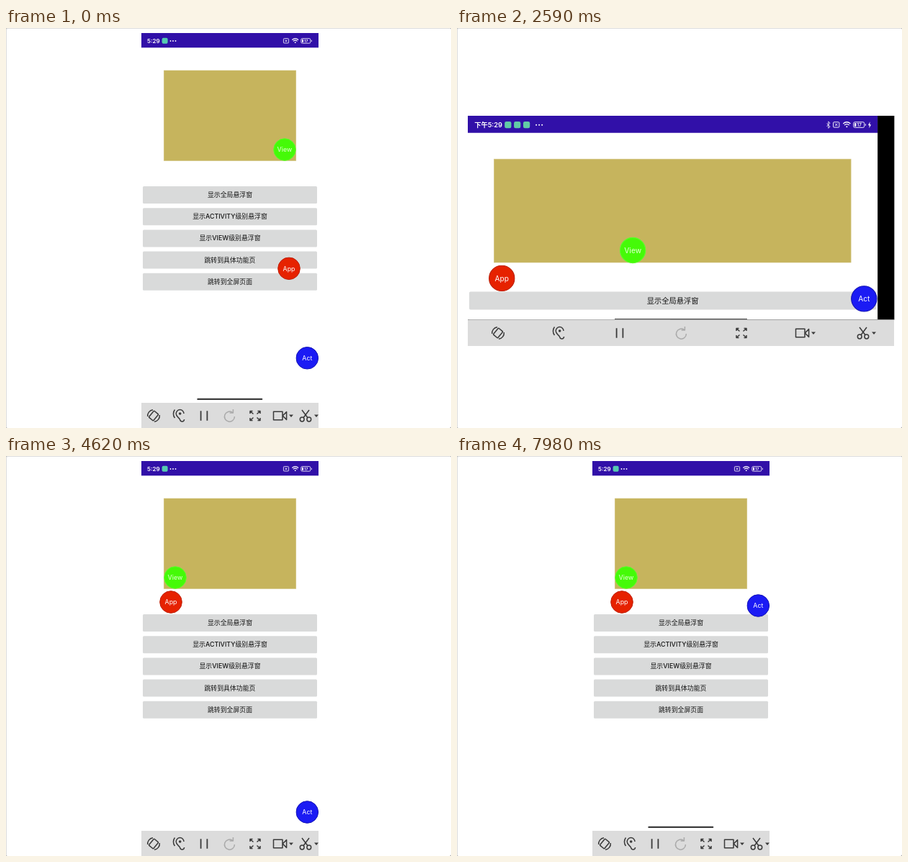
These frames come from a looping animation (618x556 px, 8 s). An HTML page:

```html
<!DOCTYPE html>
<html lang="zh">
<head>
<meta charset="utf-8">
<title>Floating windows</title>
<style>
/* --f: 1 while the window is landscape; --p: turn progress, portrait 0 to landscape 1 */
@property --f { syntax: "<number>"; inherits: true; initial-value: 0; }
@property --p { syntax: "<number>"; inherits: true; initial-value: 0; }
html, body { margin: 0; width: 100%; height: 100%; overflow: hidden; background: #777; }
#stage {
  position: relative; box-sizing: border-box; width: 618px; height: 556px; overflow: hidden;
  background: #fff; border-radius: 2px; box-shadow: inset 1px 1px #dcdcdc;
  font-family: Inter, "Noto Sans CJK SC", "Noto Sans CJK", sans-serif;
  animation: flip 8s step-end infinite, turn 8s cubic-bezier(.33, 1, .68, 1) infinite;
}
.win {
  position: absolute; overflow: hidden; background: #000; transform-origin: 0 0;
  left: calc(188px - 173px * var(--f)); top: calc(7px + 115px * var(--f));
  width: calc(246px + 268px * var(--f)); height: calc(514px - 268px * var(--f));
  transform: scale(calc(1 + .1525 * var(--f)));
}
.page {
  --dip: calc(var(--p) * (1 - var(--p)));
  position: absolute; left: 50%; top: 50%; overflow: hidden; background: #fff;
  width: calc(246px + 268px * var(--p) - 180px * var(--dip));
  height: calc(514px - 268px * var(--p) - 180px * var(--dip));
  transform: translate(-50%, -50%) rotate(calc(90deg * (var(--f) - var(--p))));
}
.page svg { position: absolute; left: 0; top: 0; transform-origin: 0 0; transform: scale(calc(1 - .25 * var(--dip))); }
.land { opacity: calc((var(--p) - .3 + .3 * var(--f)) / .7); }
.port .info { opacity: calc(1 - 3 * var(--p)); }
.bar { fill: #3110a8; }
.tan { fill: #c6b45d; stroke: #d3c684; stroke-width: .5; }
.btn rect { fill: #d9dada; }
.btn text { fill: #151515; font-size: 8.9px; font-weight: 500; text-anchor: middle; }
.info { fill: #fff; font-size: 8px; font-weight: 600; }
.ball text { fill: #fff; font-size: 8.8px; text-anchor: middle; }
.ball circle { stroke-width: 1; }
.view .b { fill: #45fa08; stroke: #5dfb2c; }
.view text { fill: #d2ffbd; font-weight: 500; }
.app .b { fill: #e62200; stroke: #bd1d02; }
.act .b { fill: #1b1bf4; stroke: #1212b4; }
.touch { fill: #cfc6ff; fill-opacity: .65; animation: touch 8s step-end infinite; }
.home { fill: #3c3c3c; animation: home 8s linear infinite; }
.port .view { animation: view 8s step-end infinite; }
.port .app { animation: app 8s step-end infinite; }
.port .act { animation: act 8s ease-in-out infinite; }
.land .view { transform: translate(198.8px, 162.2px); }
.land .app { animation: snap 8s ease-in-out infinite; }
.land .act { transform: translate(477.5px, 220.7px); }
.tools {
  position: absolute; display: flex; overflow: hidden; background: #dcdcdc;
  left: calc(188px - 173px * var(--f)); top: calc(521px - 115.4px * var(--f));
  width: calc(246px + 346px * var(--f)); height: calc(35px + 1.4px * var(--f));
}
.tools span { flex: 1 1 0; position: relative; }
.tools svg {
  position: absolute; left: calc(50% - .5px); top: 50%; width: 1px; height: 1px; overflow: visible;
  fill: none; stroke: #3a3a3a; stroke-width: 1.5; stroke-linejoin: round;
}
.tools .caret { fill: #3a3a3a; stroke: none; }
@keyframes flip { 0%, 50.75% { --f: 0; } 19.25% { --f: 1; } }
@keyframes turn { 0%, 21.2% { --p: 0; } 27.125%, 50.75% { --p: 1; } 57.5%, 100% { --p: 0; } }
@keyframes home { 0%, 17.5% { opacity: 1; } 19.2%, 61.25% { opacity: 0; } 64.75%, 100% { opacity: 1; } }
@keyframes view { 0% { transform: translate(199px, 162px); } 40%, 100% { transform: translate(47px, 162px); } }
@keyframes app { 0% { transform: translate(205px, 327.3px); } 40%, 100% { transform: translate(41px, 196px); } }
@keyframes snap { 0%, 28% { transform: translate(205px, 196px); } 32.375%, 100% { transform: translate(41px, 196px); } }
@keyframes act {
  0%, 40% { transform: translate(230.3px, 451.8px); }
  40.1%, 81.375% { transform: translate(230.3px, 488px); }
  84.875%, 88.375% { transform: translate(222px, 400px); }
  93.5%, 95.5% { transform: translate(205px, 201px); }
  98%, 100% { transform: translate(230.3px, 201px); }
}
@keyframes touch { 0%, 95.5% { opacity: 0; } 73.4% { opacity: 1; } }
</style>
</head>
<body>
<div id="stage">
  <svg width="0" height="0" style="position:absolute">
    <defs>
      <g id="signs" fill="none" stroke="#fff" stroke-width=".8">
        <rect x="197.4" y="7.6" width="7.2" height="6.4" rx="1"/>
        <path d="M199.5 9.3l3 3m0-3l-3 3"/>
        <path d="M209.3 9.5q4.4-3.8 8.8 0M210.8 11.3q2.9-2.4 5.8 0" stroke-width="1.1"/>
        <circle cx="213.7" cy="13.2" r=".9" fill="#fff" stroke="none"/>
        <rect x="221.8" y="7.6" width="13" height="6.6" rx="1.6"/>
        <path d="M236.3 9.8v2.2"/>
        <rect x="223" y="8.8" width="2" height="4.2" fill="#fff" stroke="none"/>
        <text x="226" y="13" font-size="5.4" fill="#fff" stroke="none">17</text>
      </g>
      <g id="dots"><circle cx="1" cy="11" r=".9"/><circle cx="4.5" cy="11" r=".9"/><circle cx="8" cy="11" r=".9"/></g>
      <path id="caret" d="M12-1.5h6l-3 3.4z"/>
      <g id="view" class="ball view"><circle class="b" r="15.3"/><text y="3.2">View</text></g>
      <g id="app" class="ball app"><circle class="b" r="15.3"/><text y="3.2">App</text></g>
      <g id="act" class="ball act"><circle class="b" r="15.3"/><text y="3.2">Act</text></g>
    </defs>
  </svg>

  <div class="win"><div class="page">
    <svg class="port" width="246" height="514">
      <rect class="bar" width="246" height="20.3"/>
      <g class="info">
        <text x="8" y="13.8">5:29</text>
        <rect x="28.6" y="6.8" width="8" height="8" rx="2" fill="#55cbb0"/>
        <use href="#dots" x="39.5"/>
        <use href="#signs"/>
      </g>
      <rect class="tan" x="31.2" y="52" width="183.6" height="125.6"/>
      <g class="btn"><rect x="2" y="213" width="242" height="24" rx="1.5"/><text x="123" y="228">显示全局悬浮窗</text></g>
      <g class="btn"><rect x="2" y="243.2" width="242" height="24" rx="1.5"/><text x="123" y="258.2">显示ACTIVITY级别悬浮窗</text></g>
      <g class="btn"><rect x="2" y="273.4" width="242" height="24" rx="1.5"/><text x="123" y="288.4">显示VIEW级别悬浮窗</text></g>
      <g class="btn"><rect x="2" y="303.6" width="242" height="24" rx="1.5"/><text x="123" y="318.6">跳转到具体功能页</text></g>
      <g class="btn"><rect x="2" y="333.8" width="242" height="24" rx="1.5"/><text x="123" y="348.8">跳转到全屏页面</text></g>
      <rect class="home" x="77.3" y="507.8" width="91" height="2.2" rx="1.1"/>
      <g class="view"><use href="#view"/></g>
      <g class="app"><use href="#app"/></g>
      <g class="act"><use href="#act"/><circle class="touch" cx="6" cy="-9" r="7"/></g>
    </svg>

    <svg class="land" width="514" height="246">
      <rect width="514" height="246" fill="#fff"/>
      <rect class="bar" width="494" height="20.6"/>
      <g class="info">
        <text x="8" y="14">下午5:29</text>
        <g fill="#62cba6">
          <rect x="44.4" y="7" width="8" height="8" rx="2"/>
          <rect x="55.6" y="7" width="8" height="8" rx="2"/>
          <rect x="66.8" y="7" width="8" height="8" rx="2"/>
        </g>
        <use href="#dots" x="81.5"/>
        <use href="#signs" x="243"/>
        <path d="M432.5 9.2l4 4-2 1.8v-8l2 1.8-4 4" fill="none" stroke="#fff" stroke-width=".7"/>
        <path d="M484.6 7.2l-2.2 4.4h1.6l-.4 3.4 2.4-4.4h-1.6z"/>
      </g>
      <rect class="tan" x="31.5" y="52.2" width="430.2" height="124.8"/>
      <g class="btn"><rect x="1.7" y="212.2" width="490.5" height="21.6" rx="1.5"/><text x="247" y="226.2">显示全局悬浮窗</text></g>
      <rect x="177" y="244.6" width="159.6" height="1.4" fill="#555"/>
      <rect x="493.8" width="20.2" height="246"/>
      <g class="view"><use href="#view"/></g>
      <g class="app"><use href="#app"/></g>
      <g class="act"><use href="#act"/></g>
    </svg>
  </div></div>

  <div class="tools">
    <span><svg>
      <rect x="-4" y="-5.8" width="8" height="11.6" rx=".8" transform="rotate(40)"/>
      <path d="M-8.3 1A8.4 8.4 0 0 1-1-8.3M8.3-1A8.4 8.4 0 0 1 1 8.3"/>
    </svg></span>
    <span><svg>
      <path d="M-5.5-8.5A9 9 0 0 0-5.5 3M7-3a5.4 5.4 0 0 0-10.8 0c0 5 4.4 5 5.4 8.4 1 3.8 5.6 3.4 6-.4"/>
      <circle cx="1.7" cy="-3" r="1.8" fill="#3a3a3a" stroke="none"/>
    </svg></span>
    <span><svg><path d="M-4.4-6.8V6.8M4.4-6.8V6.8" stroke-width="1.8"/></svg></span>
    <span><svg style="stroke:#aaa"><path d="M4.4-4.6A7 7 0 1 0 7.4 1M5.4-9v5H.6"/></svg></span>
    <span><svg>
      <path d="M-2.5-2.5L-7-6.5M2.5-2.5L7-6.5M-2.5 2.5L-7 6.5M2.5 2.5L7 6.5M-7-3v-3.5h3.5M7-3v-3.5H3.5M-7 3v3.5h3.5M7 3v3.5H3.5"/>
    </svg></span>
    <span><svg>
      <path d="M-9.5-5.8H3V5.8H-9.5zM3.2 0L8.6-5.4V5.4z"/>
      <use class="caret" href="#caret"/>
    </svg></span>
    <span><svg>
      <path d="M-5-8L3.2 3M5-8L-3.2 3"/>
      <circle cx="-4.8" cy="5" r="2.9"/><circle cx="4.8" cy="5" r="2.9"/>
      <use class="caret" href="#caret"/>
    </svg></span>
  </div>
</div>
</body>
</html>
```
